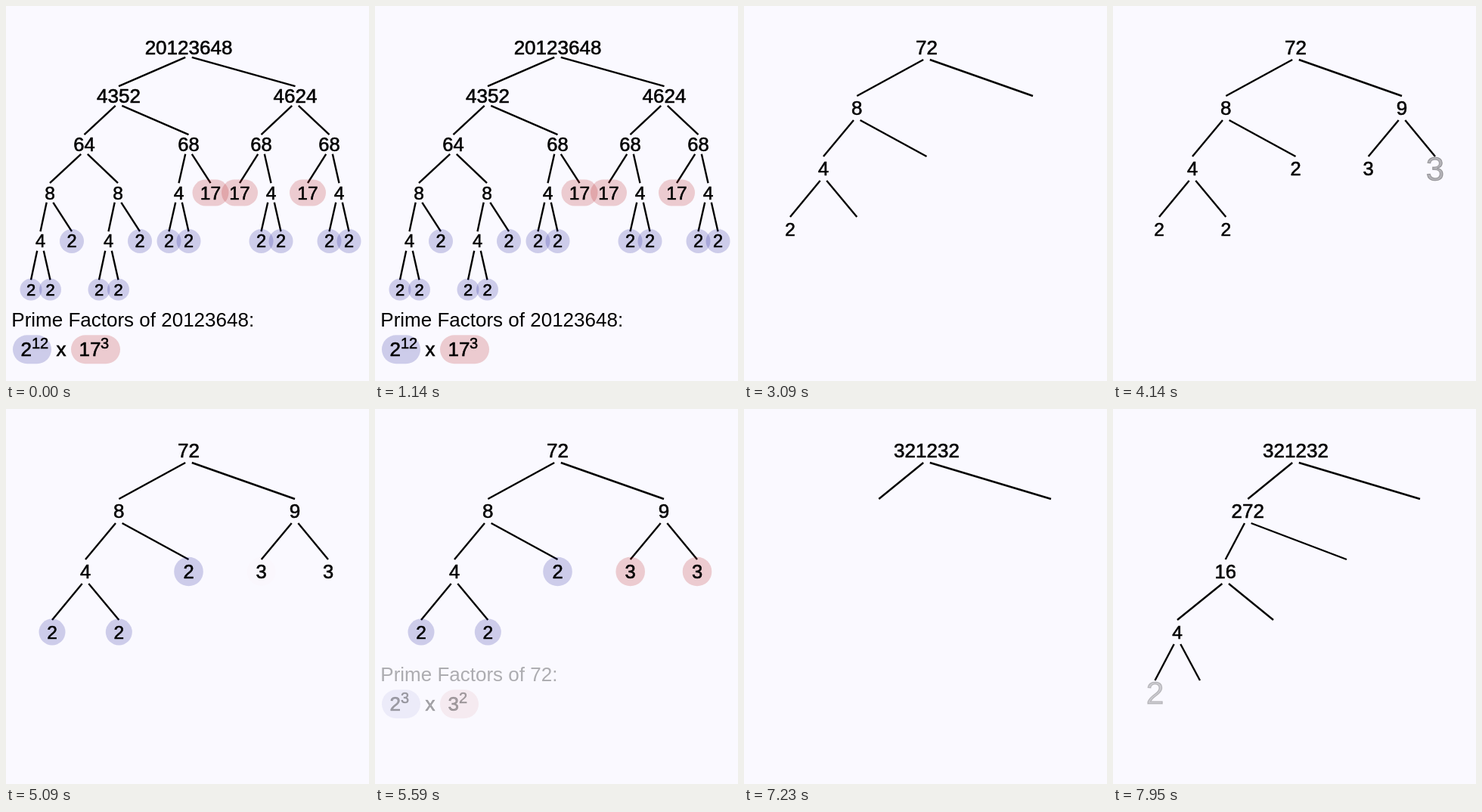
Recreate the animation shown at these times as an HTML page with a canvas. Size 480 px wide and 496 px high, loop 8000 ms.

```html
<!DOCTYPE html>
<html lang="en">
<head>
<meta charset="utf-8">
<title>Prime factor trees</title>
<style>
  html, body { margin: 0; width: 100%; height: 100%; overflow: hidden; background: #faf9ff; }
  canvas { display: block; }
</style>
</head>
<body>
<canvas id="stage" width="480" height="496"></canvas>
<script>
const ctx = document.getElementById('stage').getContext('2d');
const LOOP = 8000, POP = 100, LINE_FADE = 130, NEVER = 1e6, TOP = 55;
const FONT = '"Liberation Sans", Arial, sans-serif';
const SIZES = [26, 26, 25.5, 24.5, 23.5, 22];
const RADII = [19, 19, 19.3, 17.5, 16, 14.5];
const BLUE = 'rgba(0,0,139,.18)', RED = 'rgba(180,20,20,.2)';

// Nodes in depth-first order: [depth, value, x, appears at, highlighted at]
const trees = [
  { from: 0, to: 2080, gap: 64, title: -POP, titleY: 424, factors: [[2, 12], [17, 3]], nodes: [
    [0, 20123648, 241.5],
    [1, 4352, 149],
    [2, 64, 103.5],
    [3, 8, 58], [4, 4, 45.5], [5, 2, 33], [5, 2, 58.5], [4, 2, 87],
    [3, 8, 148], [4, 4, 135.5], [5, 2, 123], [5, 2, 148.5], [4, 2, 177],
    [2, 68, 241.5],
    [3, 4, 228.5], [4, 2, 215.5], [4, 2, 241.5], [3, 17, 270.5],
    [1, 4624, 382.5],
    [2, 68, 337.5],
    [3, 17, 309], [3, 4, 350.5], [4, 2, 337.5], [4, 2, 363.5],
    [2, 68, 427.5],
    [3, 17, 399], [3, 4, 440.5], [4, 2, 427.5], [4, 2, 453.5]
  ] },
  { from: 2080, to: 6820, gap: 80, title: 5560, titleY: 360, factors: [[2, 3], [3, 2]], nodes: [
    [0, 72, 241.5, 2135],
    [1, 8, 149.3, 2475],
    [2, 4, 105, 2690],
    [3, 2, 61, 2905, 4385], [3, 2, 149.3, 3120, 4615],
    [2, 2, 241.5, 3385, 4835],
    [1, 9, 382, 3615],
    [2, 3, 337.7, 3840, 5088], [2, 3, 426, 4113, 5320]
  ] },
  { from: 6820, to: LOOP, gap: 80, title: NEVER, titleY: 0, factors: [], nodes: [
    [0, 321232, 241.5, 6875],
    [1, 272, 178.3, 7250],
    [2, 16, 148.7, 7480],
    [3, 4, 85, 7705], [4, 2, 55.5, 7932], [4, 2, 115, NEVER],
    [3, 4, 212, NEVER],
    [2, 17, 309, NEVER],
    [1, 1181, 406, NEVER]
  ] }
];

for (const tree of trees) {
  const path = [];
  tree.nodes = tree.nodes.map(([depth, value, x, at = -LOOP, lit = -LOOP]) => {
    const node = { depth, value, x, at, lit, y: TOP + depth * tree.gap, parent: path[depth - 1], leaf: true };
    if (node.parent) node.parent.leaf = false;
    return path[depth] = node;
  });
}

const progress = (t, start, span = POP) => Math.min(1, Math.max(0, (t - start) / span));
const tint = value => value === 2 ? BLUE : RED;

function pill(x, y, w, h, color) {
  ctx.fillStyle = color;
  ctx.beginPath();
  ctx.roundRect(x - w / 2, y - h / 2, w, h, h / 2);
  ctx.fill();
}

function write(text, x, y, size, weight = 0, align = 'left') {
  ctx.font = size + 'px ' + FONT;
  ctx.textAlign = align;
  ctx.fillStyle = ctx.strokeStyle = '#000';
  ctx.fillText(text, x, y);
  if (weight) {
    ctx.lineWidth = weight;
    ctx.strokeText(text, x, y);
  }
}

function drawEdge(node, gap, t) {
  const p = node.parent, reach = gap * 0.2;
  ctx.globalAlpha = progress(t, p.at, LINE_FADE);
  ctx.strokeStyle = '#000';
  ctx.lineWidth = 2.4;
  ctx.beginPath();
  ctx.moveTo(p.x + 4.3 * Math.sign(node.x - p.x), p.y + reach);
  ctx.lineTo(node.x, node.y - reach);
  ctx.stroke();
}

function drawLight(node, t) {
  const h = RADII[node.depth] * 2;
  const extra = (String(node.value).length - 1) * 13;
  ctx.globalAlpha = progress(t, node.lit);
  pill(node.x, node.y, h + extra, h, tint(node.value));
}

function drawValue(node, t) {
  const p = progress(t, node.at), size = SIZES[node.depth];
  if (!p) return;
  ctx.save();
  ctx.globalAlpha = p;
  ctx.translate(node.x, node.y);
  ctx.scale(2 - p, 2 - p);
  write(node.value, 0, size * 0.36, size, 0.6, 'center');
  ctx.restore();
}

function drawSummary(tree, t) {
  ctx.globalAlpha = progress(t, tree.title);
  if (!ctx.globalAlpha) return;
  const y = tree.titleY;
  write(`Prime Factors of ${tree.nodes[0].value}:`, 7.3, y, 26);
  let x = 9;
  tree.factors.forEach(([base, power], i) => {
    if (i) {
      write('x', x + 13, y + 39, 26, 0.6, 'center');
      x += 26;
    }
    const digits = String(base).length * 14;
    const w = digits + 37;
    pill(x + w / 2, y + 30.3, w, 38, tint(base));
    write(base, x + 10.5, y + 39, 26, 0.6);
    write(power, x + 11 + digits, y + 28.5, 20, 0.5);
    x += w;
  });
}

function draw(t) {
  const tree = trees.find(k => t >= k.from && t < k.to);
  ctx.globalAlpha = 1;
  ctx.fillStyle = '#faf9ff';
  ctx.fillRect(0, 0, 480, 496);
  for (const n of tree.nodes) if (n.parent) drawEdge(n, tree.gap, t);
  // Leaves light up only once they are on stage
  for (const n of tree.nodes) if (n.leaf && t > n.at + POP) drawLight(n, t);
  for (const n of tree.nodes) drawValue(n, t);
  drawSummary(tree, t);
}

const begin = performance.now();
function tick() {
  draw((performance.now() - begin) % LOOP);
  requestAnimationFrame(tick);
}
tick();
</script>
</body>
</html>
```
